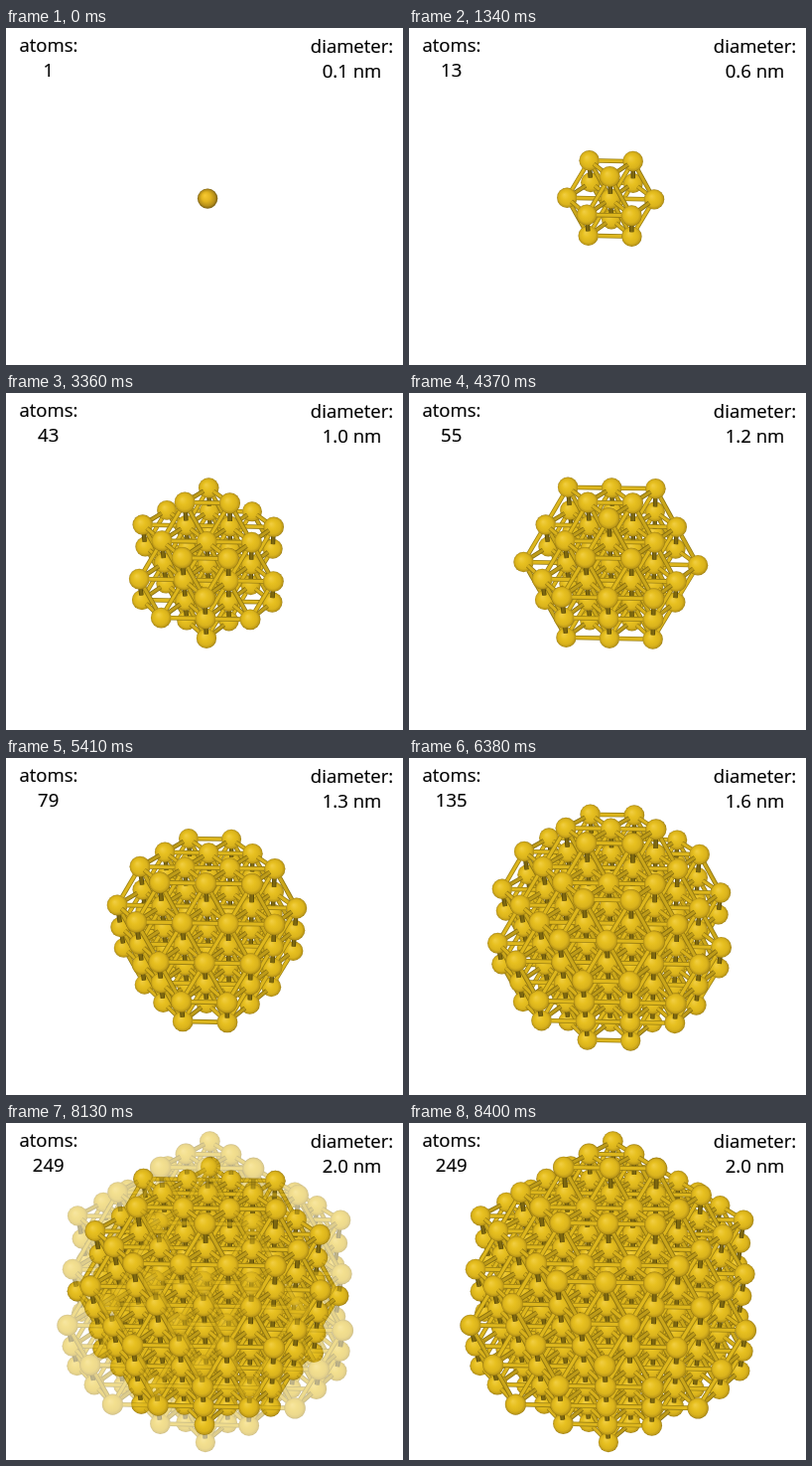
Animation, 400 px wide and 339 px high, one loop 9.4 s. Source, as an HTML page with a canvas:

```html
<!DOCTYPE html>
<html lang="en">
<head>
<meta charset="utf-8">
<title>Growing atom cluster</title>
<style>
  html, body { margin: 0; width: 100%; height: 100%; overflow: hidden; background: #fff; }
  canvas, svg { position: absolute; left: 0; top: 0; width: 400px; height: 339px; }
  text { font: 18.5px "Open Sans", "Noto Sans", sans-serif; text-anchor: middle; fill: #000; stroke: #000; stroke-width: 0.2px; }
</style>
</head>
<body>
<canvas id="view"></canvas>
<svg viewBox="0 0 400 339">
  <text x="43" y="23.5">atoms:</text>
  <text x="42.7" y="49">0</text>
  <text x="348.5" y="25">diameter:</text>
  <text x="348.5" y="50">0</text>
</svg>
<script>
const W = 400, H = 339, LOOP = 9400;
const CX = 203.1, CY = 171.6, SCALE = 31.05, EYE = 44;
const TILT = 0.105, YAW = 0.031, ROLL = 0.018;
const ATOM = 10.2, BOND = 4.5, GAP = 0.31;
const LIGHT = [-0.3, 0.4, 0.87];
const GOLD = [232, 191, 30];
const CLUSTER_SHADES = [[0, '#f1ce44'], [0.4, '#e7c020'], [0.75, '#dab31c'], [0.92, '#be9a18'], [1, '#967810']];
const SINGLE_SHADES = [[0, '#f8ca34'], [0.45, '#e2b41f'], [0.8, '#b58e1a'], [1, '#755b12']];

// Squared cutoff radius, diameter label, start of the fade, end of the fade
const stages = [
  [0, '0.1', 0, 0],
  [2, '0.6', 1070, 1340],
  [4, '0.8', 2080, 2350],
  [6, '1.0', 3090, 3360],
  [8, '1.2', 4100, 4370],
  [10, '1.3', 5110, 5410],
  [14, '1.6', 6110, 6380],
  [18, '1.7', 7120, 7390],
  [24, '2.0', 8130, 8400]
].map(([cutoff, size, start, end]) => ({ size, start, end, ...render(lattice(cutoff)) }));

// Face-centred cubic sites inside a sphere
function lattice(cutoff) {
  const sites = [];
  for (let a = -4; a <= 4; a++)
    for (let b = -4; b <= 4; b++)
      for (let c = -4; c <= 4; c++)
        if ((a + b + c) % 2 === 0 && a * a + b * b + c * c <= cutoff) sites.push(orient(a, b, c));
  return sites;
}

function turn(u, v, angle) {
  const cos = Math.cos(angle), sin = Math.sin(angle);
  return [u * cos - v * sin, v * cos + u * sin];
}

// Looks down the [111] axis with a slight turn
function orient(a, b, c) {
  let x = (a - b) / Math.SQRT2, y = (a + b - 2 * c) / Math.sqrt(6), z = (a + b + c) / Math.sqrt(3);
  [y, z] = turn(y, z, TILT);
  [x, z] = turn(x, z, YAW);
  [x, y] = turn(x, y, -ROLL);
  return [x, y, z];
}

function project([x, y, z]) {
  const m = EYE / (EYE - z);
  return { x: CX + x * SCALE * m, y: CY - y * SCALE * m, m };
}

function makeCanvas(canvas) {
  const dpr = window.devicePixelRatio || 1;
  canvas.width = W * dpr;
  canvas.height = H * dpr;
  const g = canvas.getContext('2d');
  g.scale(dpr, dpr);
  return g;
}

function drawAtom(g, site, shades) {
  const { x, y, m } = project(site), r = ATOM * m;
  const fill = g.createRadialGradient(x - r * 0.28, y - r * 0.32, 0, x, y, r);
  shades.forEach(([at, color]) => fill.addColorStop(at, color));
  g.fillStyle = fill;
  g.beginPath();
  g.arc(x, y, r, 0, 2 * Math.PI);
  g.fill();
}

function drawBond(g, p, q) {
  const axis = p.map((v, i) => (q[i] - v) / Math.SQRT2);
  const a = project(p.map((v, i) => v + axis[i] * GAP));
  const b = project(q.map((v, i) => v - axis[i] * GAP));
  const along = axis.reduce((sum, v, i) => sum + v * LIGHT[i], 0);
  const lit = 0.38 + 0.62 * Math.sqrt(Math.max(0, 1 - along * along));
  const stroke = (width, k) => {
    g.strokeStyle = `rgb(${GOLD.map(v => Math.round(v * lit * k))})`;
    g.lineWidth = width * (a.m + b.m) / 2;
    g.beginPath();
    g.moveTo(a.x, a.y);
    g.lineTo(b.x, b.y);
    g.stroke();
  };
  stroke(BOND, 0.68);
  stroke(BOND * 0.64, 0.98);
}

// Paints atoms and bonds from back to front
function render(sites) {
  const canvas = document.createElement('canvas'), g = makeCanvas(canvas);
  const shades = sites.length > 1 ? CLUSTER_SHADES : SINGLE_SHADES;
  const parts = sites.map(p => ({ z: p[2], draw: () => drawAtom(g, p, shades) }));
  sites.forEach((p, i) => sites.slice(i + 1).forEach(q => {
    if (Math.hypot(p[0] - q[0], p[1] - q[1], p[2] - q[2]) < 1.5)
      parts.push({ z: (p[2] + q[2]) / 2, draw: () => drawBond(g, p, q) });
  }));
  parts.sort((a, b) => a.z - b.z).forEach(part => part.draw());
  return { canvas, count: sites.length };
}

const view = makeCanvas(document.getElementById('view'));
const [, countText, , sizeText] = document.querySelectorAll('text');
const begin = performance.now();
let shown = '';

function update(t) {
  const index = stages.findLastIndex(s => t >= s.start);
  const stage = stages[index], fading = t < stage.end;
  const state = index + ':' + fading;
  if (state === shown) return;
  shown = state;
  const paint = (s, alpha) => {
    view.globalAlpha = alpha;
    view.drawImage(s.canvas, 0, 0, W, H);
  };
  view.clearRect(0, 0, W, H);
  if (fading) paint(stages[index - 1], 1);
  paint(stage, fading ? 0.5 : 1);
  countText.textContent = stage.count;
  sizeText.textContent = stage.size + ' nm';
}

function tick() {
  update((performance.now() - begin) % LOOP);
  requestAnimationFrame(tick);
}
tick();
</script>
</body>
</html>
```
